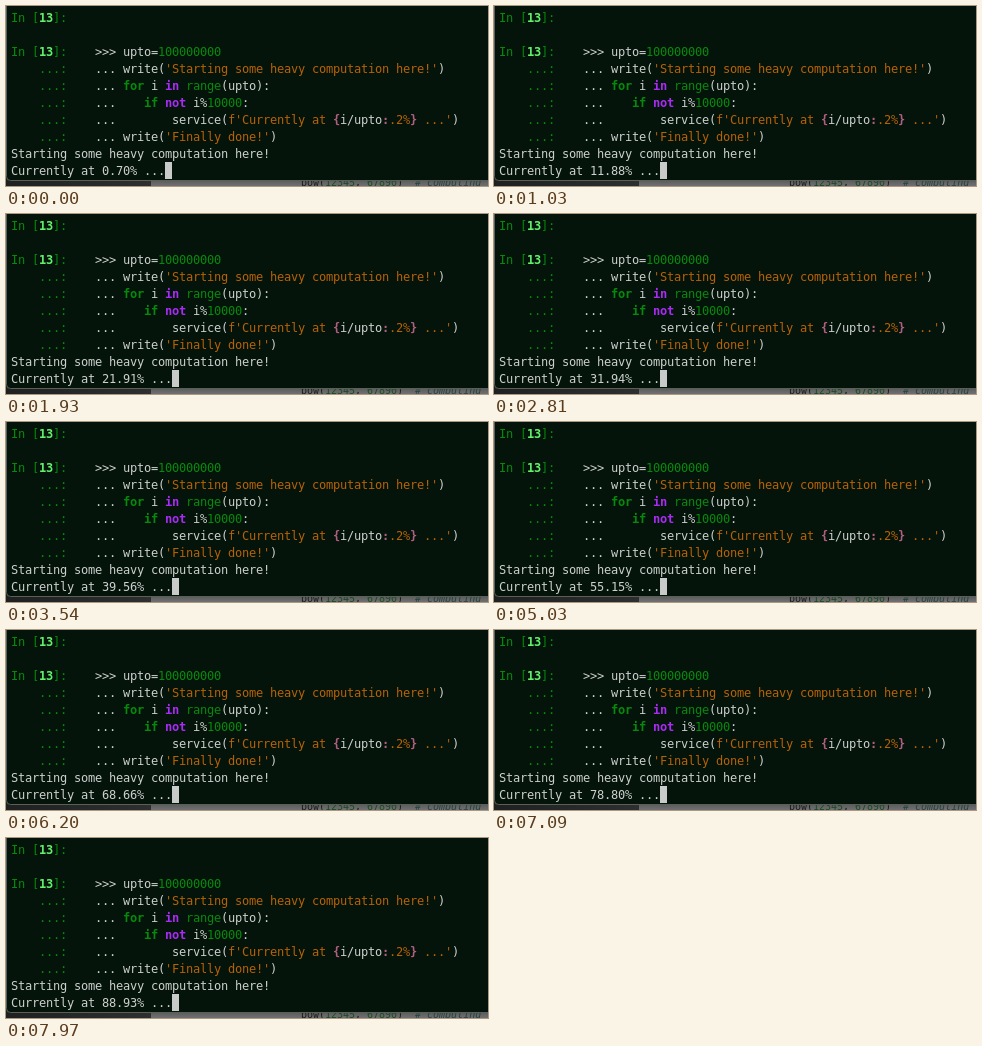
Write an HTML page that moves like this. It is 482 by 180 pixels and loops after 8 s.

```html
<!DOCTYPE html>
<html lang="en">
<head>
<meta charset="utf-8">
<title>Terminal progress</title>
<style>
  html, body { margin: 0; width: 100%; height: 100%; overflow: hidden; background: #04140b; }
  svg { display: block; width: 100%; height: 100%; }
  text { font: 12px "DejaVu Sans Mono", monospace; letter-spacing: -.0187em; white-space: pre; fill: #cdd0ce; }
  .g { fill: #078a0c; }
  .n { fill: #63f06b; font-weight: bold; }
  .k { fill: #078a0c; font-weight: bold; }
  .w { fill: #a92bf5; font-weight: bold; }
  .s { fill: #b86206; }
  .p { fill: #b0607f; font-weight: bold; }
  .page { font-size: 10px; letter-spacing: 0; fill: #1c1c1c; }
  .num { fill: #1d4a24; }
  .note { fill: #26423f; font-style: italic; }
</style>
</head>
<body>
<svg viewBox="0 0 482 180">
  <defs>
    <linearGradient id="side">
      <stop offset="0" stop-color="#1f2120"/>
      <stop offset="1" stop-color="#2e302f"/>
    </linearGradient>
    <linearGradient id="shade" x2="0" y2="1">
      <stop offset="0" stop-color="#5a5a5a"/>
      <stop offset="1" stop-color="#707070"/>
    </linearGradient>
  </defs>
  <rect y="165" width="145" height="15" fill="url(#side)"/>
  <rect x="145" y="174" width="337" height="6" fill="url(#shade)"/>
  <text class="page" y="180"><tspan x="295">pow(</tspan><tspan x="319" class="num">12345</tspan><tspan x="349">,</tspan><tspan x="361" class="num">67890</tspan><tspan x="391">)</tspan><tspan x="409" class="note"># computing</tspan></text>
  <rect x=".5" y="-10" width="500" height="184.5" rx="4" fill="#04140b" stroke="#59605c"/>
  <g id="screen"></g>
  <rect id="cursor" y="156" width="7" height="17" fill="#c9cbca"/>
</svg>
<script>
const NS = 'http://www.w3.org/2000/svg';
const screen = document.getElementById('screen');
const cursor = document.getElementById('cursor');
const LEFT = 5, CELL = 7, ROW = 17, BASE = 16, LOOP = 8000;
const colX = col => LEFT + col * CELL;

// Each part is "class|text"; a part without a class is plain.
function addRow(row, col, ...parts) {
  const line = document.createElementNS(NS, 'text');
  line.setAttribute('y', BASE + row * ROW);
  for (const part of parts) {
    const [, cls, str] = part.match(/^(?:(\w)\|)?(.*)$/);
    const span = document.createElementNS(NS, 'tspan');
    span.setAttribute('x', colX(col));
    if (cls) span.setAttribute('class', cls);
    span.textContent = str;
    line.append(span);
    col += str.length;
  }
  screen.append(line);
  return line.lastChild;
}

const prompt = ['g|In [', 'n|13', 'g|]:'];
const more = ['g|...:', '    ... '];
addRow(0, 0, ...prompt);
addRow(2, 0, ...prompt, '    >>> upto=', 'g|100000000');
addRow(3, 4, ...more, 'write(', "s|'Starting some heavy computation here!'", ')');
addRow(4, 4, ...more, 'k|for', ' i ', 'w|in', ' ', 'g|range', '(upto):');
addRow(5, 4, ...more, '   ', 'k|if', ' ', 'w|not', ' i%', 'g|10000', ':');
addRow(6, 4, ...more, '       service(', "s|f'Currently at ", 'p|{', 'i/upto', 'p|:', 's|.2%', 'p|}', "s| ...'", ')');
addRow(7, 4, ...more, 'write(', "s|'Finally done!'", ')');
addRow(8, 0, 'Starting some heavy computation here!');
const status = addRow(9, 0, 'Currently at 0.70% ...');

// Update bursts: first time, last time, number of updates.
const bursts = [
  [140, 1180, 8], [1330, 2370, 8], [2520, 3540, 8], [3690, 4730, 8],
  [4880, 5910, 8], [6060, 7090, 8], [7230, 7970, 6]
];
const ticks = bursts.flatMap(([from, to, n]) =>
  Array.from({ length: n }, (_, i) => Math.floor((from + (to - from) * i / (n - 1)) / 10) * 10));

// Known progress after a number of updates; linear in between.
const keys = [[0, .7], [7, 11.88], [19, 31.94], [29, 47.18], [34, 55.15], [42, 68.66], [54, 88.93]];
function progress(step) {
  const i = Math.max(1, keys.findIndex(key => key[0] >= step));
  const [s0, v0] = keys[i - 1], [s1, v1] = keys[i];
  return v0 + (v1 - v0) * (step - s0) / (s1 - s0);
}

function draw(ms) {
  const step = ticks.filter(t => t <= ms).length;
  const str = `Currently at ${progress(step).toFixed(2)}% ...`;
  if (status.textContent !== str) status.textContent = str;
  // The cursor leaves its first cell with the first update and stays put after it.
  cursor.setAttribute('x', colX(step ? 23 : 22));
}

const start = performance.now();
function frame() {
  draw((performance.now() - start) % LOOP);
  requestAnimationFrame(frame);
}
draw(0);
requestAnimationFrame(frame);
</script>
</body>
</html>
```
